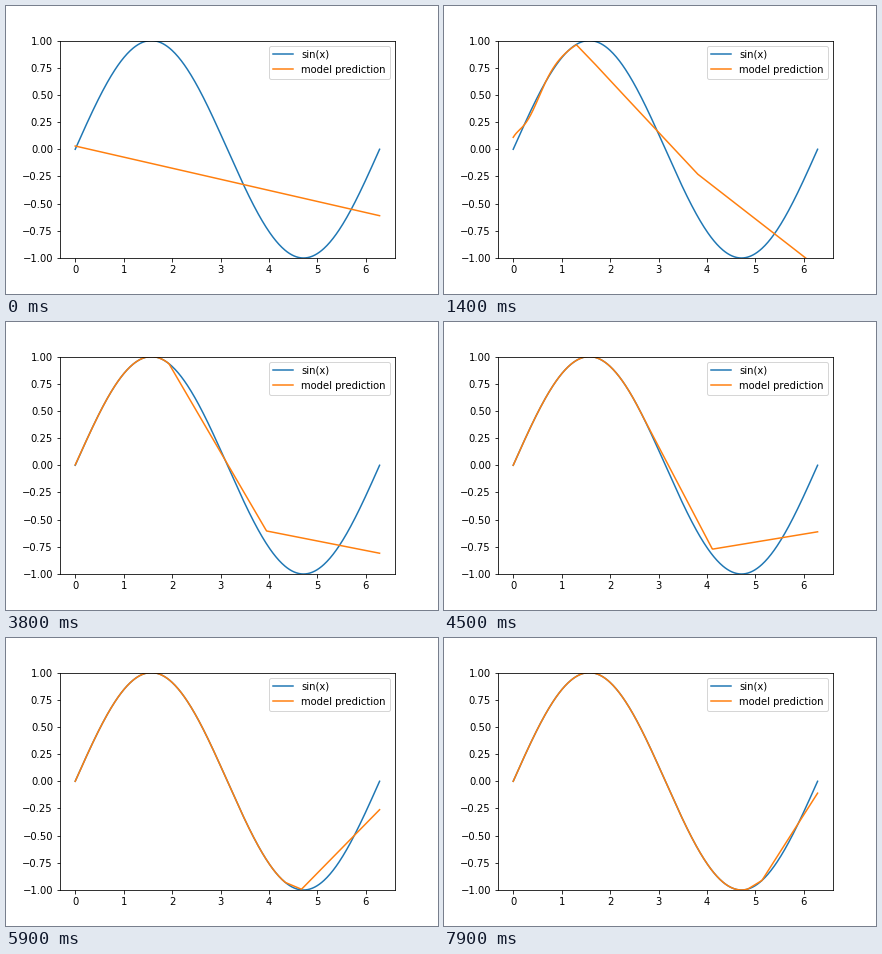
These frames come from a looping animation (432 px wide and 288 px high, 8 s). A matplotlib script:

```python
import numpy as np
import matplotlib.pyplot as plt
from matplotlib.animation import FuncAnimation

FRAMES, STEP, WARMUP = 80, 100, 14
END = 2 * np.pi
x = np.linspace(0, END, 400)
sine = np.sin(x)
plt.rcParams["text.kerning_factor"] = 6


def rise(t, mid, width):
    return 1 / (1 + np.exp((mid - t) / width))


def bump(t, width):
    return np.exp(-((t - WARMUP) / width) ** 2)


def fitted(t):
    """Follow the sine up to `front`, then two straight pieces via `knee`."""
    front = 1.16 + 0.01 * t + 2.9 * rise(t, 47.8, 5.3)
    knee = 3.8 + 1.4 * rise(t, 55, 8)
    knee_y = np.sin(knee) + 0.39 * bump(t, 22)
    end_y = -1.11 + 1.02 * rise(t, 45.4, 8.5)
    tail = np.interp(x, [front, knee, END], [np.sin(front), knee_y, end_y])
    ripple = 0.11 * bump(t, 13) * np.cos(7 * x) * np.exp(-2.5 * x)
    return np.where(x < front, sine, tail) + ripple


def prediction(t):
    untrained = 0.03 - 0.102 * x
    w = 1 - (1 - min(t / WARMUP, 1)) ** 3
    return (1 - w) * untrained + w * fitted(t)


fig, ax = plt.subplots(figsize=(6, 4), dpi=72, facecolor="white")
fig.subplots_adjust(left=0.125, right=0.9, bottom=0.125, top=0.88)
ax.plot(x, sine, label="sin(x)")
model, = ax.plot(x, prediction(0), label="model prediction")
pad = 0.05 * END
ax.set_xlim(-pad, END + pad)
ax.set_ylim(-1, 1)
ax.legend(loc="upper right")


def update(i):
    model.set_ydata(prediction(i))
    return model,


anim = FuncAnimation(fig, update, frames=FRAMES, interval=STEP, repeat=True)
plt.show()
```
